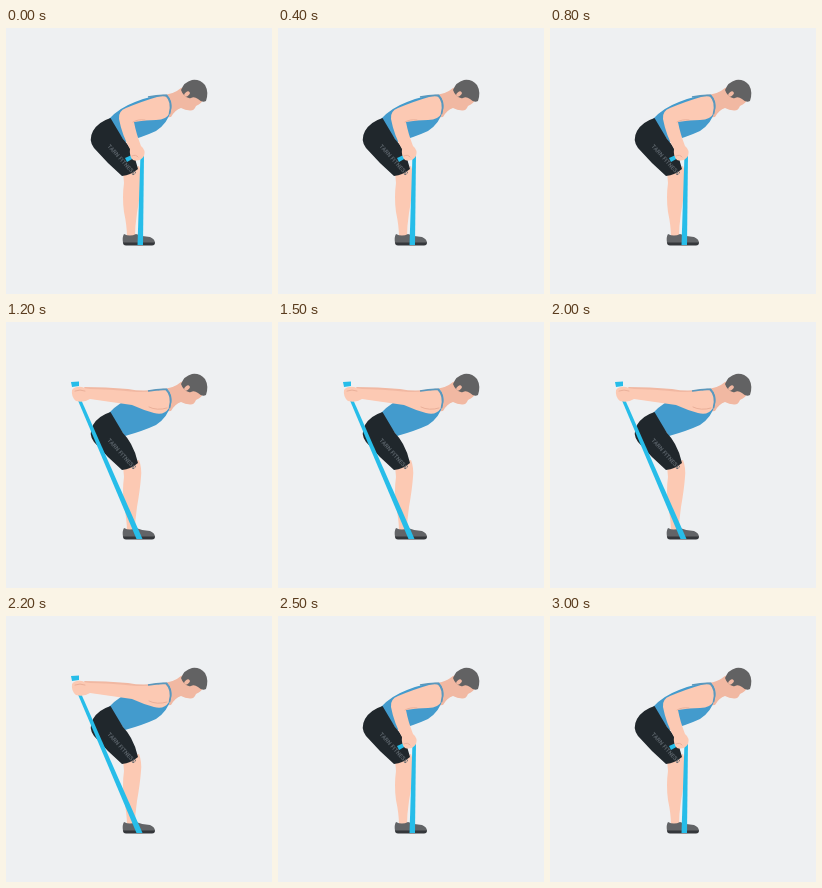
Recreate the animation shown at these times as an HTML page. Size 266 px wide and 266 px high, loop 3.1 s.

```html
<!DOCTYPE html>
<html lang="en">
<head>
<meta charset="utf-8">
<title>Band kickback</title>
<style>
  html, body { margin: 0; width: 100%; height: 100%; overflow: hidden; background: #eef0f2; }
  svg { display: block; width: 100vw; height: 100vh; }
  .skin { fill: #fcc9b3; }
  .shade { fill: #f1b8a2; }
  .top { fill: #439bcd; }
  .shorts { fill: #20272c; }
  .hair { fill: #626263; }
  .band { fill: #27bde9; }
  .crease { fill: none; stroke: #e8ad97; stroke-width: .9; stroke-linecap: round; }
  .strap { fill: none; stroke: #5a98bd; stroke-width: 1.7; }
  text { font: 700 5.8px Roboto, sans-serif; fill: #586067; }
</style>
</head>
<body>
<svg viewBox="0 0 266 266">
  <rect width="266" height="266" fill="#eef0f2"/>

  <!-- leg and shoe -->
  <path class="skin" d="M117 144 L133 138 Q136 146 135 155 Q134 168 131 185 Q129 198 129 209 L121 209 Q121 198 118 184 Q116 169 118 155Z"/>
  <path fill="#626467" d="M118 206 Q124 209 130 206 Q137 209 144 209 Q149 211 149 215 L117 215 Q116 209 118 206Z"/>
  <path fill="#34373b" d="M117 214.5 H149 Q149 217.5 146 217.5 H120 Q117 217.5 117 214.5Z"/>

  <!-- neck and head -->
  <path class="shade" d="M155 67 Q167 67 175 60 L190 56 L199 70 Q196 75 190 78 Q188 83 184 82.5 Q179 82 175 80 Q169 82 165 89 L156 90Z"/>
  <path class="hair" d="M175 62 Q178 54 186 52 Q194 51 199 57 Q203 64 200 73 Q196 75 192 71 Q188 68 185 70 Q181 71 178 67 Q176 65 175 62Z"/>
  <ellipse class="shade" cx="181" cy="66" rx="3.2" ry="2" transform="rotate(-40 181 66)"/>

  <!-- torso -->
  <path class="top" d="M103 91 Q113 80 129 74 Q146 67 161 66.5 Q167 73 165 82 Q162 95 150 103 Q137 109 119 114Z"/>

  <!-- shorts -->
  <path class="shorts" d="M104.5 90 Q92 94 87 103 Q82 112 88 120 Q101 135 116 148 Q125 147 132 141 Q130 131 125 122 Q121 115 117 111 Q111 101 104.5 90Z"/>
  <text transform="translate(101 118.5) rotate(48)">TARN FITNESS</text>

  <g id="down">
    <path class="band" d="M134.5 126 H138 L137 217 H131.5Z"/>
    <path class="band" d="M119 130 L128 126 V130 L121 134Z"/>
    <path class="skin" d="M161 69 Q166 75 164 84 Q161 92 150 92 Q139 92 128 94 Q130 105 135 118 Q140 122 138 128 Q134 134 127 132 Q123 128 124 121 Q116 107 113 91 Q112 83 120 80 Q137 73 151 69 Q157 67 161 69Z"/>
    <path class="crease" d="M127 94 Q132 91 139 92 M126 128 Q130 126 132 129"/>
  </g>

  <g id="back">
    <path class="band" d="M70.5 75 L73.5 74 L136.5 217 H130.5Z"/>
    <path class="shade" d="M78 65 Q100 65 122 67 Q138 70 152 67 L152 76 L82 72Z"/>
    <path class="skin" d="M162 69 Q166 78 163 86 Q158 94 148 91 Q137 88 126 83 Q105 80 84 77 Q78 81 70 79 Q65 75 66 68 Q69 64 76 65 Q80 67 84 67 Q103 67 125 69.5 Q139 71 151 68.5 Q158 67 162 69Z"/>
    <path class="band" d="M65 60 L73 59.5 V64 L66 65Z"/>
    <path class="crease" d="M69 69 Q74 67 79 69 M143 85 Q151 89 161 86"/>
  </g>

  <path class="strap" d="M142 69 Q153 67 160 67.5 Q167 74 163.5 86"/>
</svg>
<script>
  const LOOP = 3100, LIFT = 900, LOWER = 2400;
  const down = document.getElementById("down");
  const back = document.getElementById("back");
  const show = (el, on) => el.setAttribute("visibility", on ? "visible" : "hidden");

  function draw(now) {
    const t = now % LOOP;
    const lifted = t >= LIFT && t < LOWER;
    show(down, !lifted);
    show(back, lifted);
  }

  const start = performance.now();
  function tick() {
    draw(performance.now() - start);
    requestAnimationFrame(tick);
  }
  tick();
</script>
</body>
</html>
```
